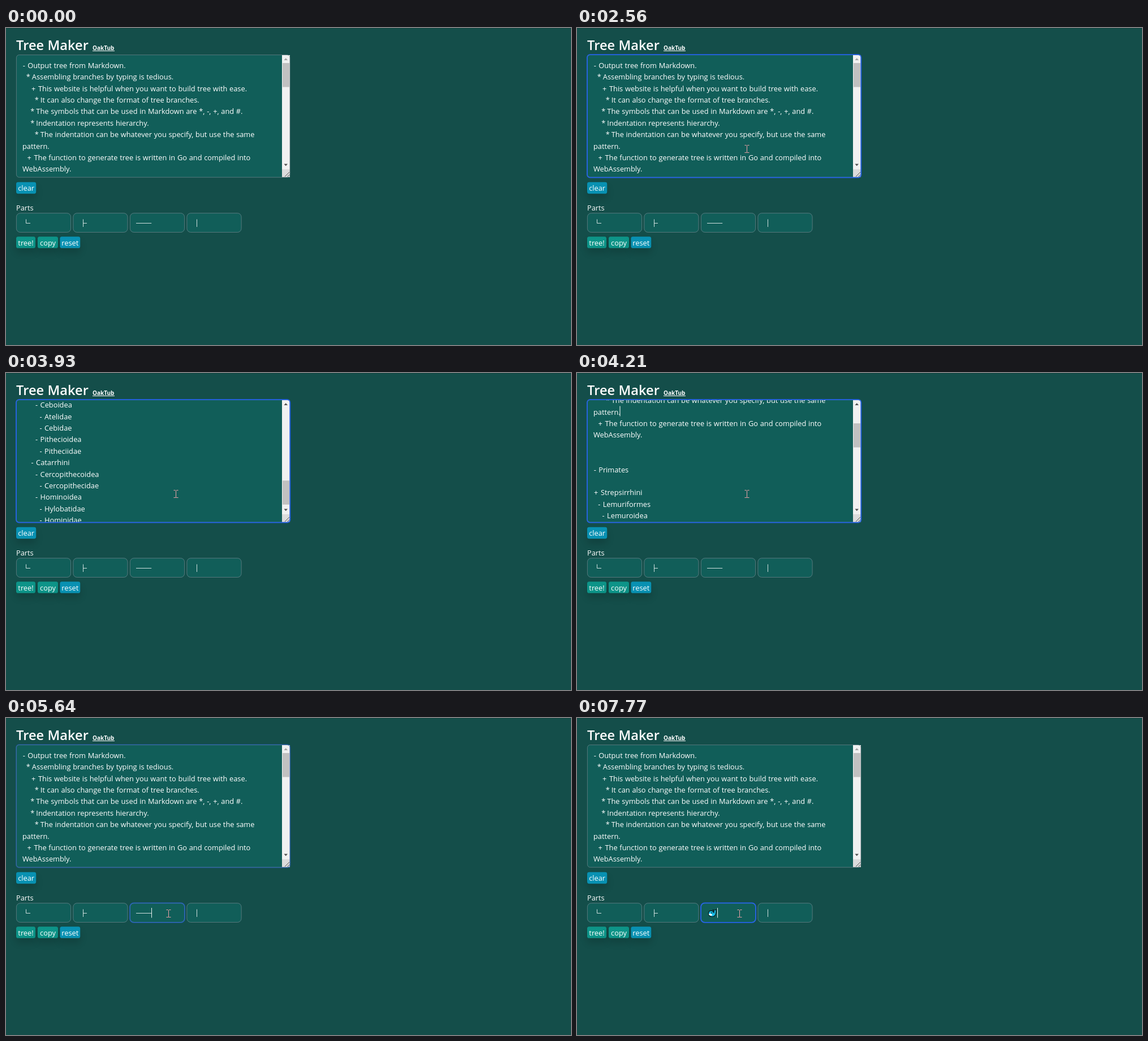
An HTML page with a canvas for the animation above (8 s loop, 999 by 561 pixels).

```html
<!DOCTYPE html>
<html lang="en">
<head>
<meta charset="utf-8">
<title>Tree Maker</title>
<style>
  html, body { margin: 0; width: 100%; height: 100%; overflow: hidden; background: #144e4a; }
  canvas { display: block; }
</style>
</head>
<body>
<canvas id="stage" width="999" height="561"></canvas>
<script>
const ctx = document.getElementById('stage').getContext('2d');
const LOOP = 8000, ROW = 20.4, MAX_SCROLL = 676;
const SANS = '"Open Sans", "Noto Sans", sans-serif';
const CJK = '"Noto Sans CJK JP", "Noto Sans CJK", "Noto Sans", sans-serif';
const BLUE = '#2563eb', TEAL = '#0d9488', CYAN = '#0891b2', FIELD = '#115e59';

const LINES = `- Output tree from Markdown.
  * Assembling branches by typing is tedious.
    + This website is helpful when you want to build tree with ease.
      * It can also change the format of tree branches.
    * The symbols that can be used in Markdown are *, -, +, and #.
    * Indentation represents hierarchy.
      * The indentation can be whatever you specify, but use the same
pattern.
  + The function to generate tree is written in Go and compiled into
WebAssembly.


- Primates

+ Strepsirrhini
  - Lemuriformes
    - Lemuroidea
      - Cheirogaleidae
      - Indriidae
      - Lemuridae
      - Lepilemuridae
    * Daubentonioidea
      * Daubentoniidae
  - Lorisiformes
    - Galagidae
    - Lorisidae

+ Haplorrhini
  - Tarsiiformes
    - Tarsiidae
  - Simiiformes
    - Platyrrhini
      - Ceboidea
        - Atelidae
        - Cebidae
      - Pithecioidea
        - Pitheciidae
    - Catarrhini
      - Cercopithecoidea
        - Cercopithecidae
      - Hominoidea
        - Hylobatidae
        - Hominidae`.split('\n');
const BULLET = { '-': 5.45, '*': 5.67, '+': 9.3 };

// Stepped timelines: [time, value]
const SCROLL = [[0, 0], [2820, 70], [2890, 190], [2970, 300], [3040, 402.6], [3130, 490],
  [3200, 570], [3270, 640], [3340, MAX_SCROLL], [3930, 662.3], [4000, 540], [4070, 400],
  [4140, 265], [4210, 140], [4280, 50], [4350, 0]];
const AREA_FOCUS = [[0, 0], [2100, .35], [2170, .75], [2230, 1], [5640, .4], [5770, 0]];
const PART_FOCUS = [[0, 0], [5640, .6], [5770, 1]];
const AREA_CARET = [[0, 0], [2100, 1], [2560, 0], [3060, 1], [3560, 0], [4060, 1],
  [4550, 0], [5060, 1], [5640, 0]];
const INPUT = [[0, '──'], [6050, '─'], [6180, ''], [6450, 'ｋ'], [6710, 'く'], [6780, 'くｊ'],
  [6910, 'くじ'], [7050, 'くじｒ'], [7190, 'くじら'], [7640, 'whale']];
const K_LIST = ['ｋｋｋｋ', 'k', '㎏', '㎞', 'kilned'];
const KU_LIST = ['く', 'ください', 'くる', '国', '句'];
const KUJI_LIST = ['くじ', 'くじら', '九時', '鯨', 'くじ引き'];
const WHALE_LIST = ['くじら', '鯨', 'クジラ', 'くじら雲', 'クジラ類'];
const POPUP = [[0, null], [6580, K_LIST], [6710, KU_LIST], [6910, KUJI_LIST],
  [7190, WHALE_LIST], [7770, null]];

// Pointer legs: start, end, steps, from, to
const LEGS = [
  [260, 400, 3, [979.5, 583.5], [678, 444]],
  [660, 870, 4, [678, 444], [526, 367]],
  [1070, 1350, 5, [526, 367], [347, 236.5]],
  [1550, 1760, 4, [347, 236.5], [300.5, 214.5]],
  [4750, 5370, 10, [300.5, 214.5], [287.5, 346.5]]
];

function at(track, t) {
  let value = track[0][1];
  for (const [time, v] of track) if (time <= t) value = v;
  return value;
}

function pointerAt(t) {
  let pos = null;
  for (const [start, end, n, a, b] of LEGS) {
    if (t < start) break;
    const gap = (end - start) / (n - 1);
    const p = Math.min(n, Math.floor((t - start) / gap + 1.001)) / n;
    pos = a.map((v, i) => v + (b[i] - v) * p);
  }
  return pos;
}

function text(s, x, y, size = 12.8, o = {}) {
  ctx.font = `${o.weight || 400} ${size}px ${o.family || SANS}`;
  ctx.wordSpacing = o.family ? '0px' : '0.4px';
  ctx.textAlign = o.align || 'left';
  ctx.fillStyle = o.color || '#fff';
  ctx.fillText(s, x, y);
}

function rect(x, y, w, h, color) {
  ctx.fillStyle = color;
  ctx.fillRect(x, y, w, h);
}

function round(x, y, w, h, r) {
  ctx.beginPath();
  ctx.roundRect(x, y, w, h, r);
}

function poly(points, fill) {
  ctx.beginPath();
  points.forEach(([x, y]) => ctx.lineTo(x, y));
  ctx.closePath();
  ctx.fillStyle = fill;
  ctx.fill();
}

function line(x1, y1, x2, y2, color, width = 1) {
  ctx.beginPath();
  ctx.moveTo(x1, y1);
  ctx.lineTo(x2, y2);
  ctx.strokeStyle = color;
  ctx.lineWidth = width;
  ctx.stroke();
}

function field(x, y, w, h, r) {
  round(x, y, w, h, r);
  ctx.fillStyle = FIELD;
  ctx.fill();
}

function border(x, y, w, h, r, focus) {
  round(x + .4, y + .4, w - .8, h - .8, r);
  ctx.strokeStyle = 'rgba(125,135,145,.75)';
  ctx.lineWidth = .85;
  ctx.stroke();
  if (!focus) return;
  ctx.globalAlpha = focus;
  round(x, y, w, h, r);
  ctx.strokeStyle = BLUE;
  ctx.lineWidth = 1.8;
  ctx.stroke();
  ctx.globalAlpha = 1;
}

function button(label, x, y, w, color) {
  ctx.save();
  ctx.shadowColor = 'rgba(0,0,0,.16)';
  ctx.shadowBlur = 13;
  ctx.shadowOffsetY = 8;
  round(x, y, w, 20.4, 3.4);
  ctx.fillStyle = color;
  ctx.fill();
  ctx.restore();
  text(label, x + w / 2, y + 15.3, 12.8, { align: 'center' });
}

function scrollbar(scroll) {
  rect(488, 48, 14, 216, '#f1f1f1');
  rect(489, 62 + 131 * scroll / MAX_SCROLL, 12, 42.5, '#c1c1c1');
  poly([[491.5, 57], [498, 57], [494.7, 53.3]], scroll ? '#505050' : '#a3a3a3');
  poly([[491.5, 240.5], [498, 240.5], [494.7, 244.2]], '#505050');
  rect(488, 250, 14, 14, '#dcdcdc');
  line(493, 263, 501, 255, '#555');
  line(497.5, 263, 501, 259.5, '#555');
}

function textarea(t) {
  const scroll = at(SCROLL, t);
  field(18, 47.2, 484.3, 217.4, 5);
  ctx.save();
  ctx.beginPath();
  ctx.rect(18, 48, 470, 216);
  ctx.clip();
  LINES.forEach((s, i) => {
    const y = 70.7 + i * ROW - scroll;
    if (y < 40 || y > 285) return;
    const m = s.match(/^( *)([-*+]) (.*)/);
    if (!m) return text(s, 29, y);
    const x = 29 + m[1].length * 3.73, adv = BULLET[m[2]];
    text(m[2], x + adv / 2, y, 12.8, { align: 'center' });
    text(m[3], x + adv + 3.73, y);
  });
  if (at(AREA_CARET, t)) rect(75.5, 198.5 - scroll, 1, 18, '#fff');
  ctx.restore();
  scrollbar(scroll);
  border(18, 47.2, 484.3, 217.4, 5, at(AREA_FOCUS, t));
}

function whale(x, y) {
  ctx.lineWidth = 1.2;
  ctx.strokeStyle = '#061a20';
  ctx.beginPath();
  ctx.moveTo(x - 6.5, y - 1);
  ctx.bezierCurveTo(x - 5, y - 6, x + 1, y - 5, x + 3, y - 1);
  ctx.lineTo(x + 3.5, y - 4);
  ctx.lineTo(x + 1.5, y - 6);
  ctx.lineTo(x + 5, y - 5.5);
  ctx.lineTo(x + 7, y - 6.5);
  ctx.bezierCurveTo(x + 7, y + 3, x + 5, y + 6, x, y + 6);
  ctx.bezierCurveTo(x - 5, y + 6, x - 7, y + 3, x - 6.5, y - 1);
  ctx.fillStyle = '#19c3ee';
  ctx.fill();
  ctx.stroke();
  ctx.fillStyle = '#e8f8fc';
  ctx.beginPath();
  ctx.ellipse(x - 3, y + 2.5, 3, 1.8, .3, 0, 7);
  ctx.fill();
  rect(x - 1.5, y - 1.5, 1.7, 1.7, '#061a20');
}

function parts(t) {
  const ink = 'rgba(255,255,255,.8)', focus = at(PART_FOCUS, t);
  [18, 118.4, 219, 319.5].forEach((x, i) => {
    field(x, 327.3, 97, 34.6, 6.8);
    border(x, 327.3, 97, 34.6, 6.8, i === 2 ? focus : 0);
  });
  line(35.5, 338.5, 35.5, 345.5, ink);
  line(35.5, 345.5, 43, 345.5, ink);
  line(136.5, 338.5, 136.5, 352, ink);
  line(136.5, 345.5, 143, 345.5, ink);
  line(337.5, 338.5, 337.5, 352, ink);

  const value = at(INPUT, t);
  let end = 230 + value.length * 13.6;
  if (value === 'whale') {
    whale(239, 345.5);
    end = 248;
  } else if (value[0] === '─') {
    line(230, 345.5, end, 345.5, ink);
  } else {
    text(value, 230, 350.3, 13.6, { family: CJK, weight: 700 });
  }
  if (focus) rect(Math.floor(end), 336, 1, 17.5, 'rgba(255,255,255,.9)');
}

function popup(list) {
  if (!list) return;
  rect(201.5, 352, 159.5, 138, '#b4b8b8');
  rect(202.5, 353, 157.5, 136, '#fff');
  list.forEach((s, i) => {
    const latin = /^[a-z]+$/.test(s);
    const o = { color: '#111' };
    if (!latin) o.family = CJK;
    text(s, 232, 371.6 + i * 27.3, latin ? 12 : 12.75, o);
  });
}

function pointer(pos) {
  if (!pos) return;
  const [x, y] = pos;
  const inArea = x < 488 && y > 47 && y < 264;
  const inPart = x > 219 && x < 316 && y > 327 && y < 362;
  if (inArea || inPart) {
    const c = '#eea2a7', cx = Math.floor(x) + .5, cy = Math.floor(y);
    line(cx, cy - 6, cx, cy + 7, c);
    for (const dy of [-6.5, 6.5]) {
      line(cx - 4, cy + dy, cx - .8, cy + dy, c);
      line(cx + .8, cy + dy, cx + 4, cy + dy, c);
    }
    return;
  }
  const shape = [[0, 0], [0, 14], [3.2, 11], [5.4, 16], [7.6, 15], [5.5, 10.3], [10, 10.3]];
  poly(shape.map(([a, b]) => [x + .5 + a, y + .5 + b]), '#fff');
  ctx.strokeStyle = '#000';
  ctx.lineWidth = .9;
  ctx.stroke();
}

function draw(now) {
  const t = now % LOOP;
  rect(0, 0, 999, 561, '#144e4a');
  rect(0, 0, 999, 1, '#10433f');
  text('Tree Maker', 18, 39, 23.6, { weight: 600 });
  text('OakTub', 153, 39, 10, { weight: 700 });
  rect(153, 40, 39, 1, '#fff');
  textarea(t);
  button('clear', 18, 272.8, 35.2, CYAN);
  text('Parts', 18, 322.5);
  button('tree!', 18, 369.2, 34, TEAL);
  button('copy', 56, 369.2, 36, TEAL);
  button('reset', 95.4, 369.2, 35.8, CYAN);
  parts(t);
  popup(at(POPUP, t));
  pointer(pointerAt(t));
}

const begin = performance.now();
function tick() {
  draw(performance.now() - begin);
  requestAnimationFrame(tick);
}
tick();
</script>
</body>
</html>
```
